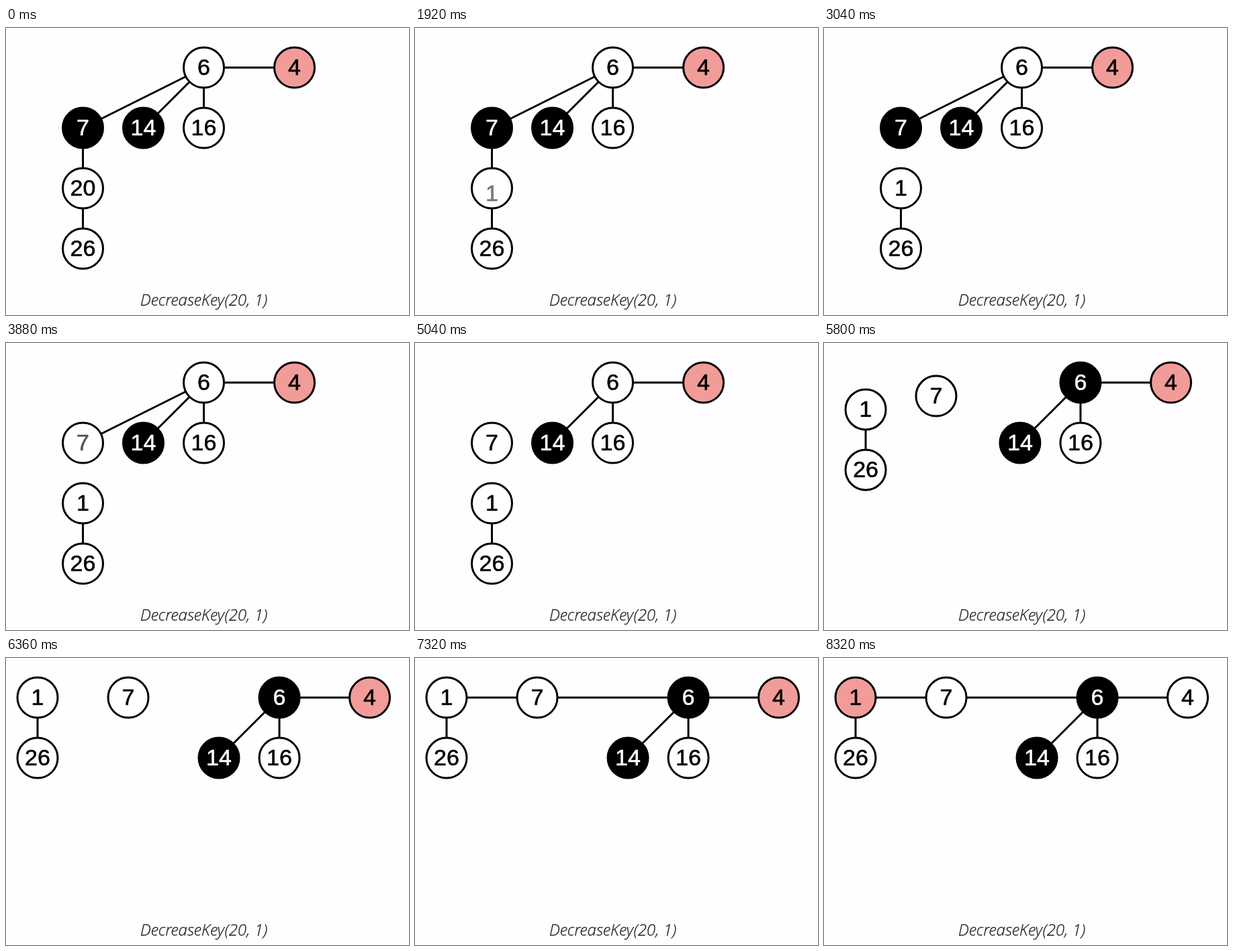
An HTML page with a canvas for the animation above (8400 ms loop, 600 by 428 pixels).

```html
<!DOCTYPE html>
<html lang="en">
<head>
<meta charset="utf-8">
<title>Heap: decrease key</title>
<style>
  html, body { margin: 0; width: 100%; height: 100%; overflow: hidden; background: #fefdff; }
  canvas { display: block; }
</style>
</head>
<body>
<canvas id="stage" width="600" height="428"></canvas>
<script>
const ctx = document.getElementById('stage').getContext('2d');
const LOOP = 8400, RADIUS = 30;
const WHITE = [255, 255, 255], BLACK = [0, 0, 0], PINK = [241, 156, 152];

// start x, y and end x, y of each node
const nodes = {
  6: [294.5, 59, 407, 59],
  4: [429.5, 59, 541.5, 59],
  7: [114.5, 149, 182, 59],
  14: [204.5, 149, 317, 149],
  16: [294.5, 149, 407, 149],
  1: [114.5, 239, 47, 59],
  26: [114.5, 329, 47, 149]
};

const ramp = (t, a, b) => Math.min(1, Math.max(0, (t - a) / (b - a)));
const ease = p => p < .5 ? 4 * p ** 3 : 1 - 4 * (1 - p) ** 3;
const mix = (a, b, p) => a + (b - a) * p;
const blend = (a, b, p) => `rgb(${a.map((v, i) => Math.round(mix(v, b[i], p)))})`;

function edge(a, b, alpha) {
  if (alpha <= 0) return;
  ctx.globalAlpha = alpha;
  ctx.beginPath();
  ctx.moveTo(a.x, a.y);
  ctx.lineTo(b.x, b.y);
  ctx.stroke();
  ctx.globalAlpha = 1;
}

function disc({ x, y }, fill) {
  ctx.beginPath();
  ctx.arc(x, y, RADIUS, 0, 2 * Math.PI);
  ctx.fillStyle = fill;
  ctx.fill();
  ctx.stroke();
}

// text with a thin outline, for slightly heavier letters
function write(text, x, y, color, weight) {
  ctx.fillStyle = ctx.strokeStyle = color;
  ctx.lineWidth = weight;
  ctx.fillText(text, x, y);
  ctx.strokeText(text, x, y);
}

function label(text, { x, y }, color, alpha = 1, dy = 0) {
  ctx.save();
  ctx.globalAlpha = alpha;
  write(text, x, y + 10.8 + dy, color, .6);
  ctx.restore();
}

function draw(t) {
  const move = ease(ramp(t, 5492, 5992));
  const pos = {};
  for (const key in nodes) {
    const [x0, y0, x1, y1] = nodes[key];
    pos[key] = { x: mix(x0, x1, move), y: mix(y0, y1, move) };
  }

  ctx.fillStyle = '#fefdff';
  ctx.fillRect(0, 0, 600, 428);
  ctx.strokeStyle = '#000';
  ctx.lineWidth = 3;

  const joined = ramp(t, 6880, 7320);
  edge(pos[6], pos[4], 1);
  edge(pos[6], pos[14], 1);
  edge(pos[6], pos[16], 1);
  edge(pos[1], pos[26], 1);
  edge(pos[7], pos[1], Math.max(1 - ramp(t, 2780, 3040), joined));
  edge(pos[6], pos[7], Math.max(1 - ramp(t, 4300, 4640), joined));

  const newMin = ramp(t, 7720, 8300);
  const fills = {
    6: blend(WHITE, BLACK, ramp(t, 5040, 5400)),
    4: blend(PINK, WHITE, newMin),
    7: blend(BLACK, WHITE, ramp(t, 3300, 3720)),
    14: '#000',
    1: blend(WHITE, PINK, newMin)
  };
  const inks = {
    6: blend(BLACK, WHITE, ramp(t, 5160, 5500)),
    7: blend(WHITE, BLACK, ramp(t, 3600, 4020)),
    14: '#fff'
  };

  ctx.textAlign = 'center';
  ctx.textBaseline = 'alphabetic';
  ctx.lineJoin = 'round';
  ctx.font = '34px "Liberation Sans", Arial, sans-serif';
  for (const key in nodes) {
    disc(pos[key], fills[key] || '#fff');
    if (key !== '1') label(key, pos[key], inks[key] || '#000');
  }

  // the old key leaves, then the new one rises into place
  const out = ramp(t, 1560, 1800), into = ramp(t, 1800, 2040);
  label('20', pos[1], '#000', 1 - out, -16 * out);
  label('1', pos[1], '#000', into, 16 * (1 - into));

  ctx.font = 'italic 300 24.2px "Open Sans", sans-serif';
  write('DecreaseKey(20, 1)', 294.5, 414, '#222', .25);
}

const start = performance.now();
function tick() {
  draw((performance.now() - start) % LOOP);
  requestAnimationFrame(tick);
}
tick();
</script>
</body>
</html>
```
